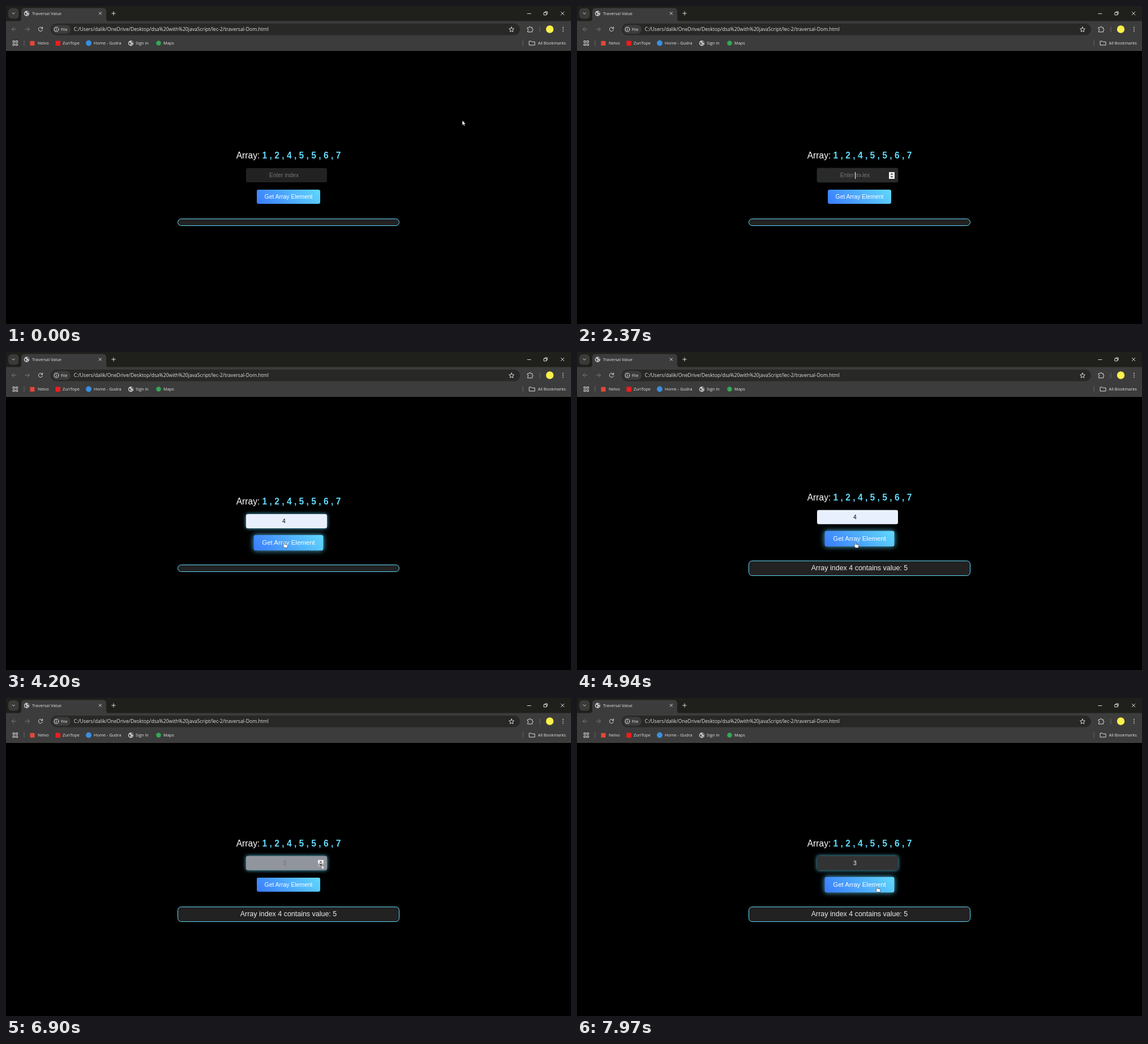
Recreate the animation shown at these times as an HTML page. Size 998 by 561 pixels, loop 8000 ms.

```html
<!DOCTYPE html>
<html lang="en">
<head>
<meta charset="utf-8">
<title>Traversal Value</title>
<style>
  html, body { margin: 0; width: 100%; height: 100%; overflow: hidden; background: #000; }
  #stage { position: relative; width: 998px; height: 561px; overflow: hidden; background: #000;
    font-family: "Liberation Sans", Arial, sans-serif; }
  #stage > svg, #stage div, #stage span { position: absolute; }
  #chrome { left: 0; top: 0; }
  #chrome text { font: 7.4px "Open Sans", sans-serif; fill: #e3e3e3; }
  #chrome .url { font-size: 8.64px; }
  .line { fill: none; stroke: #dcdcdc; stroke-width: 1; stroke-linecap: round; stroke-linejoin: round; }
  .dim { stroke: #7b7b7b; }
  .mid { text-align: center; white-space: nowrap; }
  #form { left: 0; top: 0; width: 998px; height: 561px; }
  #list { left: 0; width: 998px; top: 255px; font-size: 15.6px; line-height: 18px; color: #fff; }
  #list b { color: #61dafb; }
  #field { left: 424px; top: 286px; width: 143px; height: 25px; border-radius: 3.3px;
    background: #222; font-size: 10.4px; line-height: 25px; }
  #field .mid { left: 0; width: 134px; }
  #hint { color: #757575; }
  #four { color: #000; }
  #caret { left: 0; top: 6.5px; width: 1px; height: 12px; background: currentColor; }
  #spin { left: 127px; top: 7px; width: 10px; height: 11.5px; background: #efefef; }
  #spin svg { position: absolute; left: 0; top: 0; }
  #press { left: 0; top: 6px; width: 10px; height: 5.5px; background: #a9a9a9; }
  #button { left: 443px; top: 324px; width: 112px; height: 25.3px; border-radius: 3.3px; color: #fff;
    font-size: 10.4px; line-height: 25px; background: linear-gradient(45deg, #3a7bfd, #61dafb); }
  #result { left: 303px; top: 375.3px; width: 392px; height: 12.6px; box-sizing: border-box;
    border: 1.3px solid #61dafb; border-radius: 6.5px; background: #222; }
  #answer { left: 0; width: 998px; top: 374px; font-size: 12.48px; line-height: 15px; color: #eee; }
  #cursor { left: 0; top: 0; overflow: visible; }
</style>
</head>
<body>
<div id="stage">
  <svg id="chrome" width="998" height="79" viewBox="0 0 998 79">
    <rect width="998" height="28" fill="#1f1f1c"/>
    <rect y="26.5" width="998" height="52.5" fill="#3c3c3c"/>
    <rect y="78" width="998" height="1" fill="#4a4a45"/>
    <rect x="4" y="4" width="18.5" height="18.5" rx="6" fill="#3a3a38"/>
    <path class="line" d="M11 12l2.2 2.2 2.2-2.2"/>
    <path d="M22 27q5 0 5-5V9.500q0-6 6-6h138q6 0 6 6V22q0 5 5 5z" fill="#3c3c3c"/>
    <g id="globe">
      <circle cx="36.500" cy="13.200" r="4.700" fill="#c9ccd0"/>
      <path d="M33 11.500l2.500.7 1 1.500-1 1.300.3 1.800-2-1.500zM37 9.500l.3 1.700 2 .8.400 1.500 1-.4-.7-2.300zM37.500 14.500l1.800.5-1.300 2z" fill="#3c3c3c"/>
    </g>
    <use href="#globe" x="184" y="52.500"/>
    <text x="46" y="16">Traversal Value</text>
    <path class="line" d="M164.200 10.800l4.400 4.400m0-4.400l-4.400 4.400M186.800 13h6.400M190 9.800v6.400"/>
    <path class="line" d="M921 13.500h6M950.300 11.500h4.400v4.400h-4.400zM952 11.300v-1.300h4.200v4.200h-1.300M980.300 10.300l5.600 5.600m0-5.600l-5.600 5.600"/>
    <path class="line dim" d="M18 41h-7.500m3.500-3.500l-3.500 3.500 3.500 3.500M34 41h7.500m-3.500-3.500l3.500 3.500-3.500 3.500"/>
    <path class="line" d="M64.200 39.300a3.600 3.600 0 1 0 .3 2.700M64.600 37v2.700h-2.700"/>
    <rect x="79" y="31" width="829" height="20.500" rx="10.200" fill="#282826"/>
    <rect x="82" y="33.500" width="32" height="15.500" rx="7.700" fill="#3c3c3c"/>
    <circle class="line" cx="89" cy="41.200" r="3.900"/>
    <path class="line" d="M89 41v2M89 39.200v.1"/>
    <text x="97" y="44">File</text>
    <text class="url" x="119.700" y="44.300">C:/Users/dalik/OneDrive/Desktop/dsa%20with%20javaScript/lec-2/traversal-Dom.html</text>
    <path class="line" d="M893 37l1.300 2.900 3.100.3-2.400 2.100.7 3.100-2.700-1.600-2.700 1.600.7-3.100-2.400-2.100 3.100-.3z"/>
    <path class="line" d="M921.500 38h2.600q.2-1.800 1.400-1.800t1.400 1.800h2.600v2.700q1.500.1 1.500 1.300t-1.500 1.300v2.500h-8v-2.500q1.500-.3 1.500-1.300t-1.500-1.300z"/>
    <path stroke="#666" d="M943 36.500v10M32 60.500v10M913 60.500v10"/>
    <circle cx="960.500" cy="41" r="6.700" fill="#fbf14a"/>
    <path d="M984 37.700v.1M984 41v.1M984 44.300v.1" stroke="#dcdcdc" stroke-width="1.700" stroke-linecap="round"/>
    <path class="line" d="M12.500 61.500h2.800v2.800h-2.800zM17.800 61.500h2.800v2.800h-2.800zM12.500 66.800h2.800v2.800h-2.800zM17.800 66.800h2.800v2.800h-2.800z"/>
    <rect x="42.500" y="61.800" width="8" height="8" fill="#e4473b"/>
    <rect x="87.500" y="61.500" width="8.500" height="8.500" fill="#f11c1c"/>
    <circle cx="146" cy="65.500" r="4.900" fill="#3a8fe0"/>
    <circle cx="269.500" cy="65.500" r="4.300" fill="#34a853"/>
    <path class="line" d="M924.500 62h3.300l1.200 1.300h5v5.700h-9.500z"/>
    <text x="56" y="68">Nelvo</text>
    <text x="100" y="68">ZunTope</text>
    <text x="155" y="68">Home - Gudra</text>
    <text x="229" y="68">Sign in</text>
    <text x="278" y="68">Maps</text>
    <text x="939.500" y="68">All Bookmarks</text>
  </svg>

  <div id="form">
    <div id="list" class="mid">Array: <b>1 , 2 , 4 , 5 , 5 , 6 , 7</b></div>
    <div id="field">
      <span id="hint" class="mid">Enter index</span>
      <span id="four" class="mid">4</span>
      <span id="three" class="mid">3</span>
      <div id="caret"></div>
      <div id="spin">
        <div id="press"></div>
        <svg width="10" height="12"><path d="M2.500 4.500L5 1.700 7.500 4.500zM2.500 7.200L5 10 7.500 7.200z" fill="#444"/></svg>
      </div>
    </div>
    <div id="button" class="mid">Get Array Element</div>
  </div>
  <div id="result"></div>
  <div id="answer" class="mid">Array index 4 contains value: 5</div>

  <svg id="cursor" width="1" height="1">
    <path id="arrow" d="M0 0v8.300l1.900-1.700 1.300 2.900 1.300-.6-1.300-2.800h2.600z" fill="#fff" stroke="#222" stroke-width=".5"/>
    <path id="beam" d="M-1.800-4h1.300l.5.500.5-.5h1.300M0-3.500v7M-1.800 4h1.300l.5-.5.5.5h1.300" fill="none" stroke="#111" stroke-width=".9"/>
    <path id="hand" d="M-.9.400Q0-1 .9.400v3.800l4 .8q1.200.3 1.100 1.700l-.6 3.800h-4.800l-2.900-3.700q-.4-1 .6-1.200l.8.700z" fill="#fff" stroke="#222" stroke-width=".6"/>
  </svg>
</div>

<script>
  const LOOP = 8000, HOLD = 'steps(1)', EASE = 'ease', MOVE = 'ease-in-out';
  const CLICK = 4300;

  // Each row is [ms, value, easing towards the next row].
  function track(id, prop, rows) {
    const keys = rows.map(([ms, value, easing = HOLD]) => ({ offset: ms / LOOP, [prop]: value, easing }));
    keys.push({ offset: 1, [prop]: rows.at(-1)[1] });
    document.getElementById(id).animate(keys, { duration: LOOP, iterations: Infinity });
  }

  // Visibility flips at every listed time, starting hidden.
  const show = (id, ...times) =>
    track(id, 'opacity', [[0, 0], ...times.map((ms, i) => [ms, i % 2 ? 0 : 1])]);

  // A property that eases to a new value at each listed time.
  function fade(id, prop, first, ...changes) {
    const rows = [[0, first]];
    let last = first;
    for (const [ms, value, length = 300] of changes) {
      rows.push([ms, last, EASE], [ms + length, value]);
      last = value;
    }
    track(id, prop, rows);
  }

  const at = (x, y) => `translate(${x}px, ${y}px)`;
  function travel(id, start, ...moves) {
    const rows = [[0, at(...start)]];
    let last = start;
    for (const [from, to, x, y] of moves) {
      rows.push([from, at(...last), MOVE], [to, at(x, y)]);
      last = [x, y];
    }
    track(id, 'transform', rows);
  }

  travel('cursor', [806, 202],
    [500, 1330, 496, 301], [1770, 1830, 503, 300], [2420, 2900, 512, 338],
    [3500, 4070, 491.5, 335], [4940, 5180, 517, 298],
    [6740, 6810, 557.5, 294.5], [7300, 7700, 530, 332]);
  track('arrow', 'opacity', [[0, 1], [1210, 0], [2650, 1], [3500, 0], [6780, 1], [7530, 0]]);
  show('beam', 1210, 2650, 5060, 6780);
  show('hand', 3500, 5060, 7530);

  const dark = '#222', lit = '#333', filled = '#e8f0fe';
  fade('field', 'backgroundColor', dark, [2290, lit], [2690, filled], [6816, lit]);
  const noGlow = '0 0 0 rgba(97,218,251,0)', glow = '0 0 6.5px rgba(97,218,251,.9)';
  fade('field', 'boxShadow', noGlow, [2310, glow], [CLICK, noGlow], [5480, glow]);

  track('hint', 'opacity', [[0, 1], [2690, 0]]);
  show('four', 2690, 6816);
  show('three', 6816);
  fade('three', 'color', '#000', [6816, '#fff']);

  show('caret', 2210, 2740, 3270, 4030, 5440, 5970, 6500, 7430);
  track('caret', 'transform', [[0, at(66.5, 0)], [3500, at(70, 0)]]);
  fade('caret', 'color', '#fff', [2690, '#000'], [6816, '#fff']);

  show('spin', 1210, 3500, 5080, 7400);
  show('press', 6790, 7330);

  fade('button', 'transform', 'scale(1)', [3500, 'scale(1.1)'], [5000, 'scale(1)'], [7550, 'scale(1.1)']);
  const halo = '0 0 9px rgba(97,218,251,.85)';
  fade('button', 'boxShadow', noGlow, [3500, halo], [5000, noGlow], [7550, halo]);

  track('form', 'transform', [[0, at(0, 0)], [CLICK, at(0, -7.2)]]);
  track('result', 'top', [[0, '375.3px'], [CLICK, '368px']]);
  track('result', 'height', [[0, '12.6px'], [CLICK, '27px']]);
  show('answer', CLICK);
</script>
</body>
</html>
```
